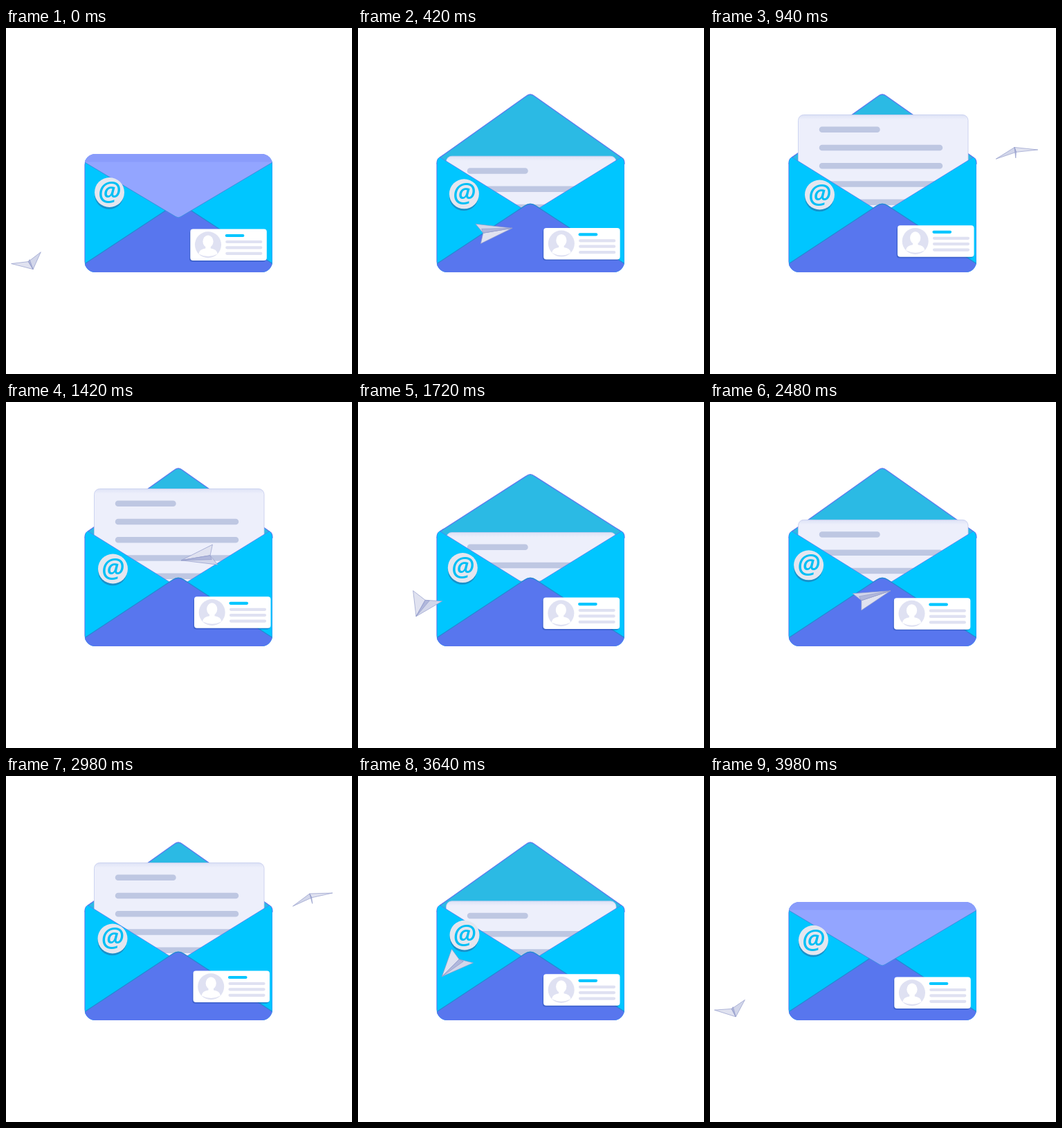
An HTML page for the animation above (4000 ms loop, 500x500 px).

```html
<!DOCTYPE html>
<html lang="en">
<head>
<meta charset="utf-8">
<title>Mail envelope</title>
<style>
html, body { margin: 0; width: 100%; height: 100%; overflow: hidden; background: #fff; }
svg { display: block; width: 100%; height: 100%; }
.rules path { stroke: #bec7e2; stroke-width: 8.5; stroke-linecap: round; }
.lines path { stroke: #dfe1f2; stroke-width: 4.2; stroke-linecap: round; }
.lines .name { stroke: #00c6ff; }
.at { font: italic 600 38px "Open Sans", sans-serif; fill: #00bff5; text-anchor: middle; }
#plane path { stroke: #929bcb; stroke-width: .7; stroke-linejoin: round; }
</style>
</head>
<body>
<svg viewBox="0 0 500 500">
  <defs>
    <linearGradient id="paper" x1="0" y1="0" x2="0" y2="1">
      <stop offset="0" stop-color="#dde2f6"/>
      <stop offset=".045" stop-color="#edeffb"/>
    </linearGradient>
    <clipPath id="face"><circle cx="25.7" cy="22.7" r="19"/></clipPath>
    <clipPath id="body"><rect x="113.500" y="182" width="271.500" height="171" rx="15.500"/></clipPath>
  </defs>

  <rect x="114" y="182.500" width="270.500" height="170" rx="15" fill="#2bbae4" stroke="#5b78ee"/>
  <path id="inner" fill="#2bbae4" stroke="#5b78ee" stroke-width="1.300"/>

  <g id="letter">
    <rect x="127.500" y="125.500" width="245.500" height="150" rx="8" fill="url(#paper)" stroke="#c3cbee" stroke-width=".8"/>
    <g class="rules">
      <path d="M162 146.700H241.500"/>
      <path d="M162 173H332M162 199.200H332M162 225.500H332M162 251.800H332"/>
    </g>
  </g>

  <g clip-path="url(#body)">
    <path fill="#00c6ff" stroke="#5b78ee" stroke-width=".8" d="M114 184L249 268L385 184V354H114Z"/>
    <path fill="#2489d4" d="M113 340.500L240.500 256.500Q249 250.500 257.500 256.500L386 340.500Z"/>
    <path fill="#5876ee" d="M113 342L241 257.800Q249 252.200 257 257.800L386 342V354H113Z"/>
    <g id="outer">
      <path id="flap" fill="#93a5ff" stroke="#3f8ce0"/>
      <path fill="#8a9cfb" d="M113 182H386V193.500H113Z"/>
    </g>
  </g>

  <g id="sticker">
    <circle cx="-.5" cy="3.300" r="21" fill="#1791cb"/>
    <circle r="21.500" fill="#e4e6ef"/>
    <text class="at" y="11.500">@</text>
  </g>

  <g id="card">
    <rect x="-1.200" y="1.700" width="110.500" height="45.500" rx="4" fill="#254fae" opacity=".5"/>
    <rect width="110.500" height="45.500" rx="4" fill="#fff"/>
    <circle cx="25.700" cy="22.700" r="19" fill="#dfe1f2"/>
    <g clip-path="url(#face)" fill="#fff">
      <ellipse cx="25.700" cy="18" rx="7.600" ry="9"/>
      <path d="M12 36Q13 29 22 28V23H29.500V28Q38.500 29 39.500 36Q26 43 12 36Z"/>
    </g>
    <g class="lines">
      <path class="name" d="M52.500 9.500H76"/>
      <path d="M53 18.500H102M53 26.800H102M53 35.300H102"/>
    </g>
  </g>

  <g id="plane">
    <path id="wingA" fill="#e0e2f0"/>
    <path id="wingB" fill="#d2d6ea"/>
    <path id="fin" fill="#b0b7db"/>
  </g>
</svg>
<script>
const $ = id => document.getElementById(id);
const LOOP = 4000, TRIP = 2000;

// Drift of the two stickers: time, x, y.
const stickerDrift = [
  [0, 149.5, 237.5], [940, 158.5, 241], [1420, 154.5, 241], [2080, 147.5, 237.5],
  [2740, 142, 235], [2980, 154, 235], [3640, 154, 230]
];
const cardDrift = [
  [0, 266.3, 290.5], [940, 271, 285.3], [1420, 272, 281.3], [2080, 263.2, 284.5],
  [2980, 270.5, 281.5], [3640, 268, 286.3]
];

// Smooth looping curve through unevenly timed keys.
function drift(keys, t) {
  const n = keys.length;
  const key = k => keys[(k + n) % n];
  const time = k => key(k)[0] + Math.floor(k / n) * LOOP;
  let i = n - 1;
  while (keys[i][0] > t) i--;
  const h = time(i + 1) - time(i), u = (t - time(i)) / h;
  return [1, 2].map(axis => {
    const at = k => key(k)[axis];
    const slope = k => (at(k + 1) - at(k - 1)) / (time(k + 1) - time(k - 1)) * h;
    const a = at(i), b = at(i + 1), m = slope(i), q = slope(i + 1);
    return a + u * (m + u * (3 * (b - a) - 2 * m - q + u * (2 * (a - b) + m + q)));
  });
}

function ease(t, start, end) {
  const u = Math.min(1, Math.max(0, (t - start) / (end - start)));
  return (1 - Math.cos(Math.PI * u)) / 2;
}

const move = (id, [x, y]) =>
  $(id).setAttribute('transform', `translate(${x.toFixed(2)} ${y.toFixed(2)})`);

function drawFlap(open) {
  const apex = 274.5 - 179.5 * open;
  const up = apex < 188;
  $('inner').style.display = up ? '' : 'none';
  $('outer').style.display = up ? 'none' : '';
  $('inner').setAttribute('d', `M114 196Q114 190 117 188L243 ${apex + 3.5}
    Q249 ${apex - 1.5} 255 ${apex + 3.5}L382 188Q385 190 385 196Z`);
  $('flap').setAttribute('d', `M112 181H387V193L253 ${apex - 2}Q249 ${apex + 1} 245 ${apex - 2}L112 193Z`);
}

// The plane circles on a tilted ellipse, turning at a steady rate.
// Its wings open and shorten at both ends, where it swings around.
function drawPlane(t) {
  const wave = lead => Math.cos(Math.PI * (t + lead) / 1000);
  const x = 238 - 202 * wave(55), y = 259 + 90 * wave(-30);
  const turn = wave(-10) ** 2;
  const heading = 116 + 0.18 * t;
  const spread = 17 + turn * (41 - 12 * wave(0));
  const length = 55 - 22 * turn;

  const offset = (degrees, r) => {
    const a = degrees * Math.PI / 180;
    return [r * Math.cos(a), -0.8 * r * Math.sin(a)];
  };
  const a = offset(heading + spread, length);
  const b = offset(heading - spread, length);
  const tail = a.map((v, i) => (v + b[i]) / 2 * (0.87 - 0.2 * turn));
  const fin = offset(heading - 10, length * (0.85 - 0.3 * turn));

  const triangle = (id, p, q) => $(id).setAttribute('d', `M0 0L${p}L${q}Z`);
  triangle('wingA', a, tail);
  triangle('wingB', b, tail);
  triangle('fin', tail, fin);
  move('plane', [x, y]);
}

function draw(ms) {
  const t = ms % LOOP, trip = t % TRIP;
  drawFlap(ease(trip, 150, 390) - ease(trip, 1690, 1910));
  move('letter', [0, 63 * (1 - ease(trip, 380, 660) + ease(trip, 1440, 1700))]);
  move('sticker', drift(stickerDrift, t));
  move('card', drift(cardDrift, t));
  drawPlane(trip);
}

const start = performance.now();
function tick() {
  draw(performance.now() - start);
  requestAnimationFrame(tick);
}
tick();
</script>
</body>
</html>
```
